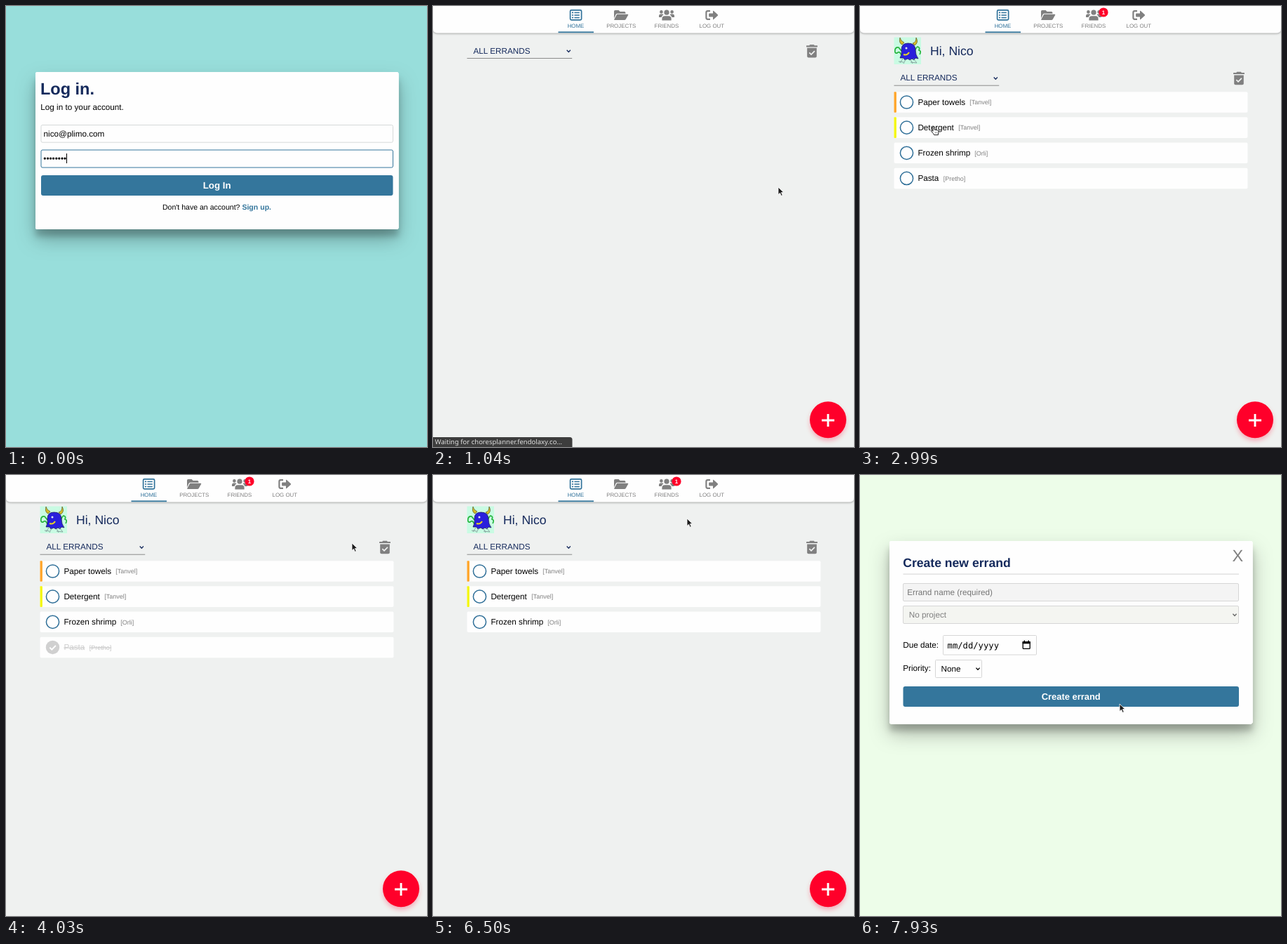
Recreate the animation shown at these times as an HTML page. Size 600x628 px, loop 8 s.

```html
<!DOCTYPE html>
<html lang="en">
<head>
<meta charset="utf-8">
<title>Errand list</title>
<style>
  html, body { margin: 0; width: 100%; height: 100%; overflow: hidden; }
  svg { display: block; width: 100vw; height: 100vh; }
  text { font-family: "Liberation Sans", Arial, sans-serif; font-size: 11.73px; text-rendering: geometricPrecision; white-space: pre; }
  .bold { font-weight: bold; }
  .mid { text-anchor: middle; }
  .navy { fill: #152a5c; }
  .mono { font-family: "DejaVu Sans Mono", monospace; }
  .status text { font-family: "Noto Sans", "Open Sans", sans-serif; font-size: 9.5px; fill: #dedede; }
  .nav text { font-size: 7.9px; text-anchor: middle; }
  .tab { color: #808080; fill: currentColor; }
  .tab.on { color: #31739b; }
</style>
</head>
<body>
<svg id="stage" viewBox="0 0 600 628" xmlns="http://www.w3.org/2000/svg"></svg>
<script>
const LOOP = 8000, STEP = 130;
const BLUE = '#34769c', GREY = '#808080', RED = '#ff0029', PAGE = '#eff1f0';

const text = (x, y, s, attrs = '') => `<text x="${x}" y="${y}" ${attrs}>${s}</text>`;
const rect = (x, y, w, h, attrs = '') => `<rect x="${x}" y="${y}" width="${w}" height="${h}" ${attrs}/>`;
const path = (d, attrs = '') => `<path d="${d}" ${attrs}/>`;
const circle = (x, y, r, attrs = '') => `<circle cx="${x}" cy="${y}" r="${r}" ${attrs}/>`;
const line = (color, width) => `fill="none" stroke="${color}" stroke-width="${width}"`;
const group = (id, body, attrs = '') => `<g id="${id}" ${attrs}>${body}</g>`;
const chevron = (x, y, color) => path(`M${x - 2.6} ${y - 1.4}l2.6 2.7l2.6 -2.7`, line(color, 1.3));

const card = height =>
  rect(42, 94, 517.5, height, 'rx="3" fill="#fefefe" filter="url(#wide)"') +
  rect(42, 94, 517.5, height, 'rx="3" fill="#fefefe" filter="url(#near)"') +
  rect(42, 94, 517.5, height, 'rx="3" fill="#fefefe"');

const defs = `<defs>
  <filter id="wide" x="-20%" y="-40%" width="140%" height="180%"><feDropShadow dx="0" dy="14" stdDeviation="14" flood-opacity=".28"/></filter>
  <filter id="near" x="-20%" y="-40%" width="140%" height="180%"><feDropShadow dx="0" dy="10" stdDeviation="4.5" flood-opacity=".2"/></filter>
  <filter id="bar" x="-5%" y="-20%" width="110%" height="160%"><feDropShadow dx="0" dy="1" stdDeviation="1.4" flood-opacity=".38"/></filter>
  <filter id="glow" x="-30%" y="-30%" width="160%" height="160%"><feDropShadow dx="0" dy="4" stdDeviation="3" flood-color="#ff0029" flood-opacity=".28"/></filter>
</defs>`;

const login = rect(0, 0, 600, 628, 'fill="#98dedb"') + card(224) +
  text(49, 125.5, 'Log in.', 'class="bold navy" font-size="23.5" style="font-size:23.5px"') +
  text(49.3, 148, 'Log in to your account.') +
  rect(50, 169.5, 501.5, 24.7, 'rx="2" fill="#fefefe" stroke="#d5d9d9"') +
  text(53.6, 185.6, 'nico@plimo.com') +
  rect(50, 205, 501.5, 25, 'id="password" rx="2" fill="#fefefe"') +
  text(53.3, 221.2, '•'.repeat(8)) +
  rect(86, 210, 1, 14, 'id="caret"') +
  rect(50, 241, 501.5, 29, 'id="loginButton" rx="3"') +
  text(300.6, 259.9, 'Log In', 'class="bold mid" fill="#fff" style="font-size:13.3px"') +
  text(300.5, 289.6, `Don't have an account? <tspan class="bold" fill="${BLUE}">Sign up.</tspan>`,
    'class="mid" style="font-size:10.56px"');

// Navigation icons
const listIcon = rect(195.6, 5.9, 16, 14, `rx="1.6" ${line('currentColor', 1.7)}`) +
  [9.4, 13, 16.6].map(y => circle(199, y, 1.1) + rect(201.4, y - .7, 7.4, 1.5)).join('');
const folderIcon = path('M258 17.5V7.6q0-1.6 1.6-1.6h5l2 2h6.2q1.6 0 1.6 1.6v1.2h-11.6q-1.4 0-2.2 1.3z') +
  path('M262.8 11.8h14.6q1.3 0 .7 1.2l-3.4 6q-.6 1-1.8 1h-14q-1.2 0-.6-1.1l3.2-6q.6-1.1 1.3-1.1z');
const friendsIcon = circle(333, 9.2, 3.6) + circle(325.4, 8.4, 2.3) + circle(340.6, 8.4, 2.3) +
  path('M326.4 20.5v-2.1q0-4.2 4-4.2h5.2q4 0 4 4.2v2.1z') +
  path('M322 16v-1.8q0-2.6 2.6-2.6h2.2q1 0 1.7.7q-2.4 1.4-2.8 3.7z') +
  path('M344 16v-1.8q0-2.6-2.6-2.6h-2.2q-1 0-1.7.7q2.4 1.4 2.8 3.7z');
const exitIcon = path('M395 7.2h-3.6q-2 0-2 2v7.6q0 2 2 2h3.6', line('currentColor', 2.2)) +
  path('M394 10.6h5v-3q0-1.4 1-.5l5.8 5.1q.7.8 0 1.6l-5.8 5.1q-1 .9-1-.5v-3h-5q-.9 0-.9-.9v-3q0-.9.9-.9z');
const tab = (id, x, label, icon, on = '') =>
  group(id, icon + text(x, 30.9, label), `class="tab ${on}"`);

const nav = `<g class="nav">` +
  path('M0 0H600V32q0 6.3-7 6.3H7q-7 0-7-6.3z', 'fill="#fefefe" filter="url(#bar)"') +
  tab('home-tab', 203.5, 'HOME', listIcon, 'on') +
  tab('projects-tab', 268.2, 'PROJECTS', folderIcon) +
  tab('friends', 332.9, 'FRIENDS', friendsIcon) +
  tab('exit-tab', 397.3, 'LOG OUT', exitIcon) +
  rect(178.5, 36.4, 50.5, 1.8, `fill="${BLUE}"`) +
  group('badge', circle(347, 9, 6.6, `fill="${RED}"`) +
    text(347, 12, '1', 'class="bold" fill="#fff"')) + `</g>`;

const avatar = rect(48.5, 44.5, 38.5, 38.5, 'fill="#c9fbe3"') +
  path('M59 70q-3-7-6-3q-4 1-3-5q1-4 5-3l4 5M77 66q3-7 5-8q4 1 2 5q4 1 1 6', line('#25b43c', 1.7)) +
  path('M57 74q3-5 2-12q0-9 9.500-9q10 0 10.500 9q0 8 4 13l-4-1l-2 3l-3-2l-3 2l-3-2l-4 2l-2-3z', 'fill="#2a20dc" stroke="#10104c" stroke-width=".7"') +
  path('M60 55q-5-2-3-10q1 5 6 7zM75 53q5-1 5-8q4 7-2 11z', 'fill="#d5bd27" stroke="#453d10" stroke-width=".6"') +
  circle(66, 60, 1.5, 'fill="#dfe8ef"') +
  path('M62 69q5 2 8-3', line('#e9d224', 2)) +
  path('M61 75l-4 6M65 76l-3 6M72 76l3 6M76 75l5 6M55 79l7 1M72 80l9 1', line('#7e9b98', .9));

const toolbar = text(57.5, 67.8, 'ALL ERRANDS', 'class="navy"') +
  chevron(193.3, 64.2, '#152a5c') + rect(48.5, 74, 149.7, 1, 'fill="#8b8b8b"') +
  group('trash', rect(532, 56.300, 16, 2.1, 'rx=".6"') + path('M536 56.5l1.2-1.400h5.600l1.2 1.400z') +
    path('M533.2 59.8h13.600v11.800q0 2-2 2h-9.600q-2 0-2-2z') +
    path('M536.3 66.400l2.700 2.700l4.900-5', line(PAGE, 1.7)));

const errands = [
  { name: 'Paper towels', shop: 'Tanvel', shopX: 156.300, width: 67, edge: '#ffa62b' },
  { name: 'Detergent', shop: 'Tanvel', shopX: 140.2, width: 51, edge: '#f4f712' },
  { name: 'Frozen shrimp', shop: 'Orli', shopX: 163.2, width: 75 },
  { name: 'Pasta', shop: 'Pretho', shopX: 118.700, width: 30 },
];
const errandRow = ({ name, shop, shopX, edge }, i) => {
  const y = 137 + i * 36.150;
  const strike = 'text-decoration="line-through"';
  const words = (a, b, deco = '') => text(82.4, y + 4, name, `fill="${a}" ${deco}`) +
    text(shopX, y + 3.2, `[${shop}]`, `fill="${b}" style="font-size:9px" ${deco}`);
  return group(`row${i}`,
    rect(48.5, y - 14.800, 504, 29.600, 'rx="2" fill="#fefefe"') +
    (edge ? rect(48.5, y - 14.800, 3.400, 29.600, `rx="1" fill="${edge}"`) : '') +
    group(`open${i}`, circle(66.5, y, 9.1, line('#2f6f98', 1.5)) + words('#000', GREY)) +
    group(`done${i}`, circle(66.5, y, 9.700, 'fill="#d0d0d0"') +
      path(`M62.3 ${y + .2}l3 3l5.600 -5.800`, line('#fff', 2)) + words('#cdcdcd', '#c4c4c4', strike)));
};

const home = rect(0, 0, 600, 628, `fill="${PAGE}"`) + nav +
  group('toolbar', toolbar) +
  group('content', avatar + text(100, 69.900, 'Hi, Nico', 'class="navy" style="font-size:17.6px"') +
    errands.map(errandRow).join('')) +
  circle(563, 589.3, 26, 'id="add" filter="url(#glow)"') +
  path('M554 590h18M563 581v18', line('#fff', 2.900));

const form = rect(0, 0, 600, 628, 'fill="#edfde9"') + card(260.500) +
  text(61.2, 131, 'Create new errand', 'class="bold navy" style="font-size:17.6px"') +
  text(538.3, 122.600, 'X', `class="mid" fill="${GREY}" style="font-size:23.5px"`) +
  rect(61.5, 140.600, 478.500, 1, 'fill="#d3d3d3"') +
  rect(61.5, 154.500, 478, 25, 'rx="1.5" fill="#f4f4f4" stroke="#d6d6d6"') +
  text(67.2, 170.900, 'Errand name (required)', 'fill="#757575"') +
  rect(61.5, 186.500, 478, 25, 'rx="1.5" fill="#f4f5f1" stroke="#d6d6d6"') +
  text(69.700, 203.200, 'No project', `fill="${GREY}"`) + chevron(534, 199.200, '#666') +
  text(61.2, 245.700, 'Due date:') +
  rect(118.5, 228.500, 133, 27.500, 'rx="1" fill="#fefefe" stroke="#d6d6d6"') +
  text(124.600, 246.600, 'mm/dd/yyyy', 'class="mono" style="font-size:12.2px"') +
  rect(232.2, 237.700, 10, 9.700, `rx="1" ${line('#000', 1.3)}`) +
  path('M231.600 237h11.200v3.200h-11.200zM233.500 235.600h1.500v2h-1.500zM239.400 235.600h1.500v2h-1.500z') +
  text(61.2, 279.200, 'Priority:') +
  rect(107.5, 263.500, 66, 25, 'rx="1" fill="#fefefe" stroke="#d6d6d6"') +
  text(115.500, 280.200, 'None') + chevron(168, 276, '#000') +
  rect(61.5, 301, 478.500, 29, `rx="3" fill="${BLUE}"`) +
  text(300.700, 319.900, 'Create errand', 'class="bold mid" fill="#fff" style="font-size:12.95px"');

const status = path('M0 614H195q3.500 0 3.500 3.500V628H0z', 'fill="#3d3d3d"') + text(2.800, 624.300, '', 'id="statusText"');

const arrow = path('M0 0V10.600l2.500-2.300l1.800 4l1.900-.8l-1.800-3.900h3.400z', 'fill="#1c1c1c" stroke="#fff" stroke-width=".8"');
const hand = path('M-1 1q1-1.600 2 0v4l4.800 1q1.500.4 1.300 2l-.7 3v1.600h-5.900l-1-2l-3-3.200q-.6-1.500 1-1.200l1.500 1.200z',
  'fill="#fff" stroke="#222" stroke-width="1"') + path('M2.400 8v2.600M4.300 8v2.600', line('#555', .6));

document.getElementById('stage').innerHTML = defs + group('login', login) + group('home', home) +
  group('form', form) + group('status', status, 'class="status"') +
  group('pointer', group('arrow', arrow) + group('hand', hand));

const $ = id => document.getElementById(id);
const show = (id, on) => { $(id).style.display = on ? '' : 'none'; };
const during = (t, from, to) => t >= from && t < to;

// time, x, y, shape (1 = hand)
const route = [
  [130, 581, 275, 0], [390, 512, 262, 1], [520, 492, 258, 1], [1040, 492, 258, 0],
  [1560, 492, 258, 0], [1690, 470, 263, 0], [1820, 240, 226, 0], [1950, 106, 182, 1],
  [2210, 105, 171, 1], [3120, 105, 171, 1], [3250, 100, 205, 1], [3380, 98, 238, 1],
  [3640, 98, 238, 1], [3770, 190, 206, 0], [4030, 493, 97, 0], [4160, 518, 98, 0],
  [4290, 536, 102, 1], [4550, 543, 105, 1], [5720, 543, 105, 1], [5850, 532, 100, 1],
  [5980, 470, 62, 0], [6240, 338, 20, 1], [6370, 338, 20, 1], [6500, 362, 62, 0],
  [6890, 540, 500, 0], [7020, 572, 588, 1], [7150, 578, 602, 1], [7280, 578, 602, 0],
  [7410, 560, 575, 0], [7930, 370, 326, 0],
];

function pointerAt(t) {
  const i = Math.max(0, route.findLastIndex(k => k[0] <= t));
  const a = route[i], b = route[i + 1] || a;
  const p = b === a ? 0 : (t - a[0]) / (b[0] - a[0]);
  return { x: a[1] + (b[1] - a[1]) * p, y: a[2] + (b[2] - a[2]) * p, hand: a[3] === 1 };
}

function render(time) {
  const t = Math.floor(time % LOOP / STEP) * STEP;
  const loaded = t >= 1170;
  const overFriends = during(t, 6240, 6500), overAdd = during(t, 7020, 7280);

  show('login', t < 1040);
  show('home', during(t, 1040, 7280));
  show('form', t >= 7280);

  const focused = t < 780;
  $('password').setAttribute('stroke', focused ? BLUE : '#d5d9d9');
  show('caret', focused && t < 520);
  $('loginButton').setAttribute('fill', t >= 390 ? '#2f6b8f' : BLUE);

  show('content', loaded);
  show('badge', t >= 1300);
  $('toolbar').setAttribute('transform', `translate(0 ${loaded ? 38.7 : 0})`);
  $('trash').setAttribute('fill', during(t, 4290, 5980) ? BLUE : GREY);
  $('friends').classList.toggle('on', overFriends);
  $('add').setAttribute('fill', overAdd ? '#f01010' : RED);

  const done = [false, during(t, 2340, 2860), false, t >= 3640];
  done.forEach((isDone, i) => { show('open' + i, !isDone); show('done' + i, isDone); });
  show('row3', t < 4940);

  const site = 'pdolmaren.quibra.io/…/';
  const message = during(t, 1040, 1300) ? 'Waiting for choresplanner.fendolaxy.co…'
    : overFriends ? site + 'friends'
    : during(t, 7020, 7540) ? site + 'createerrand' : '';
  show('status', message);
  $('statusText').textContent = message;

  const p = pointerAt(t);
  show('pointer', t >= 130);
  $('pointer').setAttribute('transform', `translate(${p.x} ${p.y})`);
  show('arrow', !p.hand);
  show('hand', p.hand);
}

const start = performance.now();
function tick() {
  render(performance.now() - start);
  requestAnimationFrame(tick);
}
tick();
</script>
</body>
</html>
```
